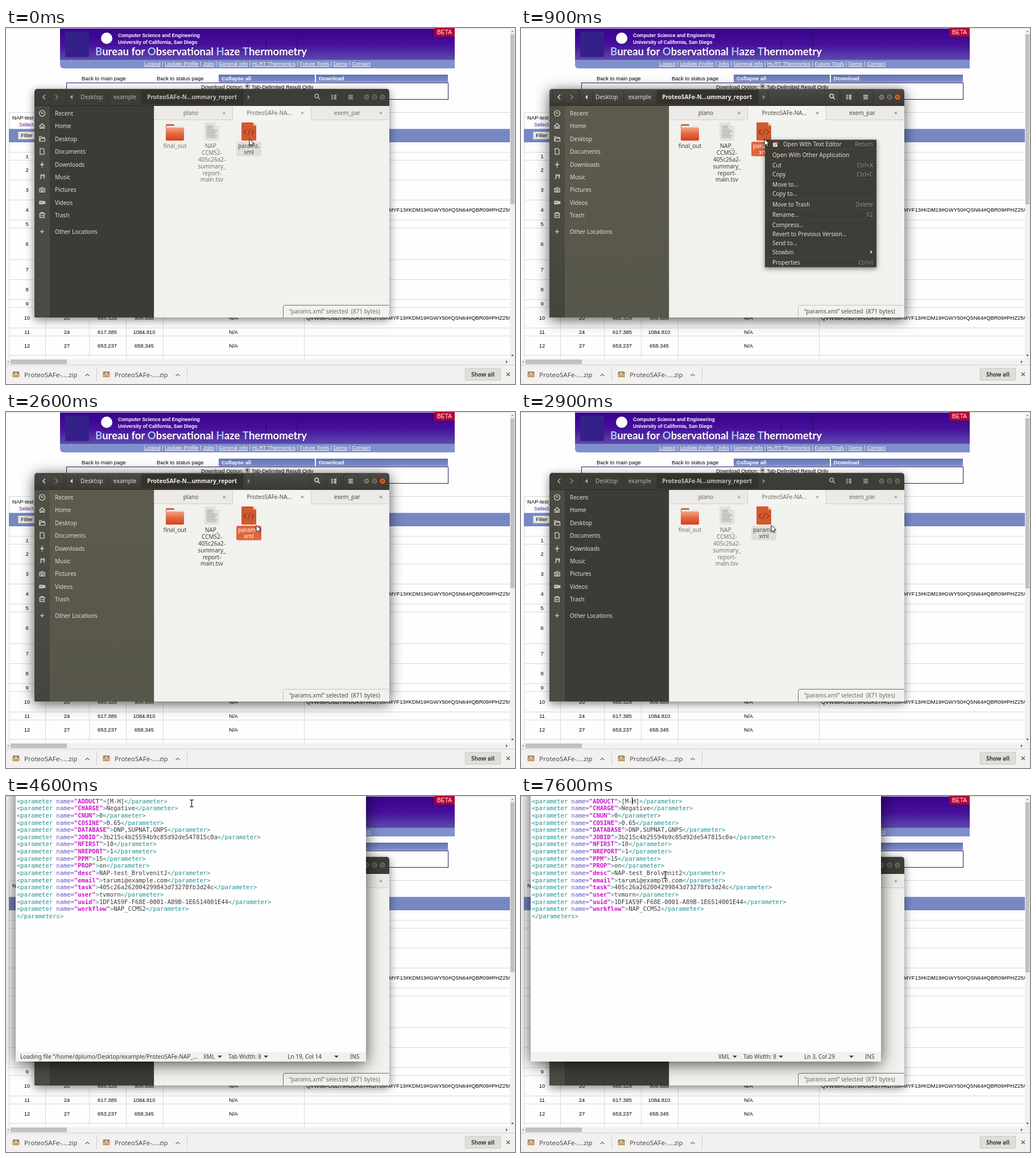
Write an HTML page with a canvas that moves like this. It is 895 by 626 pixels and loops after 8 s.

```html
<!DOCTYPE html>
<html lang="en">
<head>
<meta charset="utf-8">
<title>Opening a parameter file</title>
<style>
html, body { margin: 0; width: 100%; height: 100%; overflow: hidden; background: #fefefe; }
canvas { display: block; width: 895px; height: 626px; }
</style>
</head>
<body>
<canvas id="stage" width="895" height="626"></canvas>
<script>
const ctx = document.getElementById('stage').getContext('2d');
const LOOP = 8000, STEP = 100;
const sans = (size, weight = '') => `${weight} ${size}px "Noto Sans", "Open Sans", sans-serif`;
const arial = (size, weight = '') => `${weight} ${size}px "Liberation Sans", Arial, sans-serif`;
const mono = (weight = '') => `${weight} 10.48px "DejaVu Sans Mono", monospace`;
const UI = sans(10), PAGE = arial(9.4);

// ---------- helpers ----------
function rect(x, y, w, h, color) {
  ctx.fillStyle = color;
  ctx.fillRect(x, y, w, h);
}
function frame(x, y, w, h, color) {
  ctx.strokeStyle = color;
  ctx.lineWidth = 1;
  ctx.strokeRect(x + .5, y + .5, w - 1, h - 1);
}
function round(x, y, w, h, r, color) {
  ctx.beginPath();
  ctx.roundRect(x, y, w, h, r);
  ctx.fillStyle = color;
  ctx.fill();
}
function disc(x, y, r, color) {
  ctx.beginPath();
  ctx.arc(x, y, r, 0, Math.PI * 2);
  ctx.fillStyle = color;
  ctx.fill();
}
function fade(y0, y1, ...colors) {
  const g = ctx.createLinearGradient(0, y0, 0, y1);
  colors.forEach((c, i) => g.addColorStop(i / (colors.length - 1), c));
  return g;
}
// y is the middle of the line; returns the end of the text
function text(s, x, y, color, font = UI, align = 'left') {
  ctx.font = font;
  ctx.fillStyle = color;
  ctx.textAlign = align;
  ctx.fillText(s, x, Math.round(y + 3.9));
  return x + ctx.measureText(s).width;
}
function stroke(d, x, y, color, width = 1) {
  ctx.save();
  ctx.translate(x, y);
  ctx.strokeStyle = color;
  ctx.lineWidth = width;
  ctx.stroke(new Path2D(d));
  ctx.restore();
}
function fill(d, x, y, color) {
  ctx.save();
  ctx.translate(x, y);
  ctx.fillStyle = color;
  ctx.fill(new Path2D(d));
  ctx.restore();
}
function shadowed(x, y, w, h, r, color, blur, alpha, dy = 4) {
  ctx.save();
  ctx.shadowColor = `rgba(0,0,0,${alpha})`;
  ctx.shadowBlur = blur;
  ctx.shadowOffsetY = dy;
  round(x, y, w, h, r, color);
  ctx.restore();
}
const DOWN = 'M-4-2H4L0 2Z', CROSS = 'M-2-2L2 2M2-2L-2 2';

// ---------- web page ----------
const NAV = ['Logout', 'Update Profile', 'Jobs', 'General Info', 'HLRT Thermonics', 'Future Tools', 'Demo', 'Contact'];
const ROW_LINES = [218, 232, 267, 302, 337, 351, 407, 442, 477, 491, 527, 541, 575];
const COLUMNS = [5, 69, 146, 211, 276, 524];
const TAIL = 'MYF13#KDM19#GWY50#QSN64#QBR09#PHZ25#';
const CELLS = [
  ['20', '485.328', '906.888'],
  ['24', '617.385', '1084.810'],
  ['27', '653.237', '658.345']
];

function banner() {
  rect(0, 0, 886, 1, '#d6d6d6');
  rect(95, 1, 694, 56, fade(1, 57, '#38008e', '#46109a', '#5f4bb0'));
  for (const [x, y] of [[457, 12], [512, 1]]) rect(x, y, 1, 40 - y, '#2c0a66');
  rect(104, 6, 42, 45, '#35208a');
  disc(177, 18, 10, '#fff');
  text('Computer Science and Engineering', 197, 12.5, '#fff', arial(8.5, 'bold'));
  text('University of California, San Diego', 197, 24.5, '#fff', arial(8.5, 'bold'));
  let x = 157;
  const big = '700 18.5px Lato, "Open Sans", sans-serif';
  for (const word of ['Bureau ', 'for ', 'Observational ', 'Haze ', 'Thermometry']) {
    const lit = word === 'for ' ? 0 : 1;
    if (lit) x = text(word[0], x, 44.5, '#a9c4f8', big);
    x = text(word.slice(lit), x, 44.5, '#fff', big);
  }
  round(95, 56, 694, 15, [0, 0, 0, 6], '#8090cb');
  x = 243;
  NAV.forEach((item, i) => {
    if (i) x = text(' | ', x, 62, '#fff', PAGE);
    const end = text(item, x, 62, '#fff', PAGE);
    rect(x, 67, end - x, 1, '#fff');
    x = end;
  });
  rect(753, 0, 36, 15, '#b5002e');
  text('BETA', 771, 7.5, '#fff', arial(10.2), 'center');
}

function page() {
  rect(0, 0, 895, 626, '#fefefe');
  banner();
  text('Back to main page', 133, 88, '#000', PAGE);
  text('Back to status page', 265, 88, '#000', PAGE);
  for (const [x, w, s] of [[374, 169, 'Collapse all'], [545, 232, 'Download']]) {
    rect(x, 82, w, 13.5, fade(82, 96, '#5f73b3', '#8494cd'));
    text(s, x + 5, 88, '#fff', arial(9.4, 'bold'));
  }
  frame(106, 96, 672, 30, '#2b1373');
  text('Download Option:', 343, 103.5, '#000', PAGE);
  disc(424.5, 102.5, 4.5, '#8a8a8a');
  disc(424.5, 102.5, 3.6, '#f4f4f4');
  disc(424.5, 102.5, 2.2, '#555');
  text('Tab-Delimited Result Only', 432, 103.5, '#000', PAGE);

  const rule = '#d8d8d8';
  rect(5, 148, 881, 1, rule);
  rect(5, 148, 1, 433, rule);
  text('NAP-test_', 11, 157, '#000', PAGE);
  text('Select', 23, 169.5, '#5a189a', PAGE);
  rect(5, 177.5, 881, 23.5, '#7787c3');
  round(21, 182, 36, 14, 1, '#e8e8e8');
  frame(21, 182, 36, 14, '#bdbdbd');
  text('Filter', 26, 188.5, '#000', PAGE);
  for (const y of ROW_LINES) rect(5, y, 881, 1, rule);
  for (const x of COLUMNS) rect(x, 201, 1, 380, rule);
  for (let i = 1; i < ROW_LINES.length; i++) {
    const mid = (ROW_LINES[i - 1] + ROW_LINES[i]) / 2;
    text(i, 37, mid, '#000', PAGE, 'center');
    if (i < 10) continue;
    CELLS[i - 10].forEach((s, k) => text(s, [107, 178, 243][k], mid, '#000', PAGE, 'center'));
    text('N/A', 400, mid, '#000', PAGE, 'center');
  }
  text(TAIL, 672.7, 319.5, '#000', PAGE);
  text('QVW56#OSD75#DGK57#KDT05#' + TAIL, 528, 509, '#000', PAGE);

  rect(886, 0, 9, 593, '#f1f1f1');
  rect(0, 582, 895, 11, '#f1f1f1');
  rect(887, 11, 7, 299, '#c1c1c1');
  rect(8, 583, 99, 8, '#c1c1c1');
  fill('M-2.5 1.5H2.5L0-1.5Z', 890.5, 5.5, '#a5a5a5');
  fill('M-2.5-1.5H2.5L0 1.5Z', 890.5, 576, '#505050');
  fill('M1.5-2.5V2.5L-1.5 0Z', 3.5, 587, '#a5a5a5');
  fill('M-1.5-2.5V2.5L1.5 0Z', 880.5, 587, '#505050');
  downloads();
}

function downloads() {
  rect(0, 592, 895, 34, '#f2f1ef');
  rect(0, 592, 895, 1, '#d2d1ce');
  for (const x of [0, 159]) {
    round(x + 11.5, 604, 12, 10, 1.5, '#a98758');
    rect(x + 12, 608, 11, 5, '#c9ab7c');
    rect(x + 16, 606, 3, 3, '#e6d9c0');
    text('ProteoSAFe-....zip', x + 32, 610.5, '#4b4b4b', sans(11.5));
    stroke('M-3.5 2L0-1.5L3.5 2', x + 143, 610, '#666', 1.2);
    rect(x + 159, 597, 1, 25, '#d0cfcc');
  }
  round(807, 598, 63, 22, 2, '#dfdedb');
  frame(807, 598, 63, 22, '#cbcac7');
  text('Show all', 838.5, 609, '#3c3c3c', sans(9.9, 'bold'), 'center');
  stroke('M-3-3L3 3M3-3L-3 3', 883, 609, '#555', 1.2);
}

// ---------- file manager ----------
const PLACES = [
  ['Recent', 150, 'M5 0A5 5 0 1 1-5 0A5 5 0 1 1 5 0M-2-2L0 0H2.5'],
  ['Home', 172, 'M-5 1L0-4L5 1M-3.5 0V4.5H-1V1.5H1V4.5H3.5V0'],
  ['Desktop', 195, 'M-4.5 4V-4H-1L0-2.5H4V-1M-4.5 4L-3-1H5V4Z'],
  ['Documents', 217, 'M-3.5-5H1.5L3.5-3V5H-3.5Z'],
  ['Downloads', 240, 'M0-4.5V2M-3-1L0 2L3-1M-1 4.5H1'],
  ['Music', 262, 'M-2 3V-4H4V2M-4 3H-2M2 2H4M-2-2H4'],
  ['Pictures', 284.5, 'M-4.5-2.5H-2L-1-4H1L2-2.5H4.5V4H-4.5ZM2 .5A2 2 0 1 1-2 .5A2 2 0 1 1 2 .5'],
  ['Videos', 307, 'M-4.5-2.5H2V2.5H-4.5ZM-4.5-1H2M-4.5 1H2M2 0L5-2V2Z'],
  ['Trash', 329, 'M-5-3H5M-2-3V-4.5H2V-3M-4-3V4.5H4V-3M-1.5-1V2.5M1.5-1V2.5'],
  ['Other Locations', 358, 'M-3.5 0H3.5M0-3.5V3.5']
];

function header(active) {
  round(50, 107, 624, 32, [5, 5, 0, 0], active ? fade(107, 136, '#4b4a44', '#3b3a35') : '#3d3c37');
  rect(54, 107, 616, 1, active ? '#66655d' : '#4a4943');
  rect(50, 136, 624, 1, '#2c2b27');
  const ink = active ? '#e4e0d6' : '#b5b2a9', dim = '#8b8981';
  if (active) {
    for (const x of [55, 534, 563, 593]) frame(x, 109, x === 55 ? 47 : 27, 25, '#35342f');
  }
  rect(239, 109, 179, 25, '#33322d');
  stroke('M2-4L-2 0L2 4', 67, 121.5, ink, 1.5);
  stroke('M-2-4L2 0L-2 4', 89, 121.5, dim, 1.5);
  fill('M2-4V4L-2 0Z', 115, 121.5, ink);
  text('Desktop', 131, 121.5, ink, sans(10.2));
  text('example', 189, 121.5, ink);
  for (const x of [104, 125, 180, 237, 434]) rect(x, 110, 1, 24, '#34332e');
  text('ProteoSAFe-N…ummary_report', 248, 121.5, active ? '#f4f0e6' : '#c4c1b8', sans(10.2, 'bold'));
  fill('M-2-4V4L2 0Z', 427, 121.5, dim);
  stroke('M2-1.5A3.3 3.3 0 1 1-4.6-1.5A3.3 3.3 0 1 1 2-1.5M1 1L4.5 4.5', 547.5, 121, ink, 1.6);
  stroke('M-4.5-3H-2M-4.5 0H-2M-4.5 3H-2M0-3H4.5M0 0H4.5M0 3H4.5', 576.5, 121.5, ink, 1.8);
  stroke('M-4-3H4M-4 0H4M-4 3H4', 606, 121.5, ink, 1.5);
  ['M-2.5 0H2.5', 'M-2-2H2V2H-2Z', CROSS].forEach((d, i) => {
    const x = 634 + i * 14, hot = active && i === 2;
    disc(x, 121.5, 5.7, active ? '#2b2a26' : '#33322e');
    disc(x, 121.5, 5, hot ? '#e8572a' : active ? '#77756b' : '#65645d');
    stroke(d, x, 121.5, hot ? '#5a2010' : '#35342f');
  });
}

function sidebar(active) {
  rect(50, 137, 27, 372, active ? fade(137, 509, '#525148', '#45443d') : '#4b4a43');
  rect(77, 137, 183, 372, active ? fade(137, 509, '#5c5b4e', '#57564a') : '#3c3b35');
  for (const [name, y, icon] of PLACES) {
    stroke(icon, 63.5, y, '#eeece6', 1.1);
    text(name, 86, y, '#e2dfd8');
  }
}

function sheet(x, color, fold) {
  fill('M0 2Q0 0 2 0H20L26 6V30Q26 32 24 32H2Q0 32 0 30Z', x, 166, color);
  fill('M20 0L26 6H21Q20 6 20 5Z', x, 166, fold);
}

function files(active, hover) {
  const ink = active ? '#3c3c3c' : '#74736f';
  round(281, 169, 15, 8, 2, '#c4674c');
  rect(282, 172, 30, 8, '#f1e4da');
  round(281, 175, 32, 23, 2, fade(175, 198, '#f2a184', '#e4673f', '#d5411a'));
  text('final_out', 297, 207, ink, UI, 'center');

  sheet(349, '#e0e0de', '#f6f6f5');
  for (let i = 0; i < 8; i++) rect(353, 172 + i * 2.8, i < 2 ? 11 : 18 - i % 3 * 2, 1.2, '#a5a4a2');
  ['NAP_', 'CCMS2-', '405c26a2-', 'summary_', 'report-', 'main.tsv']
    .forEach((s, i) => text(s, 362, 207 + i * 11.9, ink, UI, 'center'));

  sheet(414, active ? '#ce5a31' : hover ? '#df6b42' : '#d2592f', '#eda285');
  stroke('M-5-4L-9 0L-5 4M5-4L9 0L5 4M2-5L-2 5', 427, 183, '#7d3018', 1.1);
  round(405, 200, 44, 25.5, 3, active ? '#de6640' : '#dfdeda');
  const label = active ? '#fff' : '#4a4a48';
  text('params.', 427, 207, label, UI, 'center');
  text('xml', 427, 218.5, label, UI, 'center');
}

function fileManager(active, hover) {
  shadowed(50, 107, 624, 402, [5, 5, 0, 0], '#f1f1ee', active ? 23 : 16, active ? .68 : .5);
  header(active);
  sidebar(active);
  rect(260, 137, 1, 372, '#d2d1cc');
  rect(261, 137, 413, 24, '#ebeae7');
  rect(399, 137, 137, 25, '#f3f3f0');
  rect(261, 161, 138, 1, '#cfcec9');
  rect(536, 161, 138, 1, '#cfcec9');
  for (const x of [398, 536]) rect(x, 137, 1, 25, '#cfcec9');
  const ink = active ? '#4c4c4a' : '#6c6b68';
  [['plano', 325], ['ProteoSAFe-NA…', 463], ['exem_par', 600]].forEach(([s, x], i) => {
    text(s, x, 149.5, ink, UI, 'center');
    stroke(CROSS, [383.5, 521, 659][i], 149.5, ink);
  });
  files(active, hover);
  round(488, 488, 186, 21, [3, 0, 0, 0], '#f1f1ee');
  stroke('M0 21.5V3Q0 0 3 0H186', 487.5, 487.5, active ? '#c3c2be' : '#6f6e6a');
  text('“params.xml” selected  (871 bytes)', 498, 498, active ? '#4c4c4a' : '#6c6b68');
}

// ---------- context menu ----------
const MENU = [
  ['Open With Text Editor', 204.5, 'Return'], ['Open With Other Application', 223],
  ['Cut', 241, 'Ctrl+X'], ['Copy', 257, 'Ctrl+C'], ['Move to…', 275], ['Copy to…', 291.5],
  ['Move to Trash', 310, 'Delete'], ['Rename…', 328, 'F2'], ['Compress…', 346],
  ['Revert to Previous Version…', 362], ['Send to…', 378], ['Stowbin', 394.5], ['Properties', 412.5, 'Ctrl+I']
];

function menu(lit) {
  shadowed(429, 196.5, 196, 224, 0, '#3d3c37', 8, .5, 2);
  for (const y of [213, 232, 266, 300, 319, 337, 403]) rect(429, y, 196, 1, '#484740');
  if (lit) rect(429, 196.5, 196, 16, fade(197, 212, '#e27148', '#d65f38'));
  MENU.forEach(([s, y, key], i) => {
    text(s, i ? 442 : 461, y, '#e6e3da');
    if (key) text(key, 619, y, lit && !i ? '#ee9672' : '#8f8d84', UI, 'right');
  });
  round(443, 200, 8, 9, 1, '#dcd9d0');
  rect(443, 200, 8, 2, '#a5532f');
  stroke('M-2 2L4-4', 448, 205, '#c9923a', 1.6);
  fill('M-1.5-3V3L2 0Z', 616, 394, '#e6e3da');
}

// ---------- text editor ----------
const PARAMS = [
  ['ADDUCT', '[M-H]'], ['CHARGE', 'Negative'], ['CNUN', '0'], ['COSINE', '0.65'],
  ['DATABASE', 'DNP,SUPNAT,GNPS'], ['JOBID', '3b215c4b25594b9c85d92de547815c0a'],
  ['NFIRST', '10'], ['NREPORT', '1'], ['PPM', '15'], ['PROP', 'on'],
  ['desc', 'NAP-test_Brolvenit2'], ['email', 'tarumi@example.com'],
  ['task', '405c26a262004299843d73278fb3d24c'], ['user', 'tvmorn'],
  ['uuid', '1DF1A59F-F68E-0001-A89B-1E6514001E44'], ['workflow', 'NAP_CCMS2']
];
const TAG = '#1f9090', ATTR = '#6453c4', STRING = '#cb14cb', INK = '#3a3a3a';

function caretOn(t) {
  if (t >= 7300) return true;
  const since = t < 3300 ? 0 : (t - 3700 + 1200) % 1200;
  return since < 800;
}

function editor(t) {
  shadowed(17, -20, 616, 487, 0, '#fefefe', 26, .7);
  PARAMS.forEach(([name, value], i) => {
    const y = 8.8 + i * 12.63;
    let x = text('<parameter ', 19, y, TAG, mono());
    x = text('name=', x, y, ATTR, mono());
    x = text(`"${name}"`, x, y, STRING, mono('bold'));
    x = text('>', x, y, TAG, mono());
    x = text(value, x, y, INK, mono());
    text('</parameter>', x, y, TAG, mono());
  });
  text('</parameters>', 19, 210.8, TAG, mono());
  const clicked = t >= 6200, moved = t >= 7600;
  if (caretOn(t)) rect(moved ? 195 : clicked ? 189 : 101, clicked ? 2 : 204, 1, 13, '#222');

  rect(17, 450, 616, 17, '#f2f1ef');
  const y = 458.5;
  if (t < 5600) text('Loading file “/home/dplumo/Desktop/example/ProteoSAFe-NAP_…', 25, y, INK);
  text('XML', 347, y, INK);
  text('Tab Width: 8', 391, y, INK);
  text(moved ? 'Ln 3, Col 29' : clicked ? 'Ln 3, Col 28' : 'Ln 19, Col 14', 525, y, INK, UI, 'center');
  text('INS', 605, y, INK);
  for (const x of [376, 457, 581]) fill(DOWN, x, y, INK);
}

// ---------- pointer ----------
const PATH = [
  [3000, 440, 201], [3500, 440, 201], [3700, 355, 94], [3800, 355, 94], [4100, 353, 7],
  [4300, 353, 7], [5200, 250, 30], [5800, 190, 14], [5900, 194, 13], [6500, 194, 13],
  [6900, 257, 138], [7000, 253, 139], [LOOP, 253, 139]
];

function beam(t) {
  const i = PATH.findIndex(p => p[0] > t);
  const [t0, x0, y0] = PATH[i - 1], [t1, x1, y1] = PATH[i];
  const k = (t - t0) / (t1 - t0), e = k * k * (3 - 2 * k);
  const x = Math.round(x0 + (x1 - x0) * e), y = Math.round(y0 + (y1 - y0) * e);
  const shape = 'M-3-6H-1L0-5L1-6H3M0-5V5M-3 6H-1L0 5L1 6H3';
  stroke(shape, x + .5, y, '#fff', 2.6);
  stroke(shape, x + .5, y, '#222', 1.3);
}

function arrow(t) {
  const [x, y] = t < 1700 ? [428, 195] : t < 1900 ? [603, 402] : [440, 199];
  const shape = 'M0 0V12L2.8 9.4L4.6 13.4L6.6 12.5L4.9 8.7H8.7Z';
  fill(shape, x, y, '#fff');
  stroke(shape, x, y, '#111');
}

// ---------- scene ----------
function draw(t) {
  page();
  fileManager(t >= 900 && t < 2700, t >= 500 && t < 900);
  if (t >= 900 && t < 2600) menu(t >= 1900);
  if (t >= 3000) {
    editor(t);
    beam(t);
  } else {
    arrow(t);
  }
}

let shown = -1;
const start = performance.now();
function tick() {
  const t = Math.floor((performance.now() - start) % LOOP / STEP) * STEP;
  if (t !== shown) draw(shown = t);
  requestAnimationFrame(tick);
}
tick();
</script>
</body>
</html>
```
